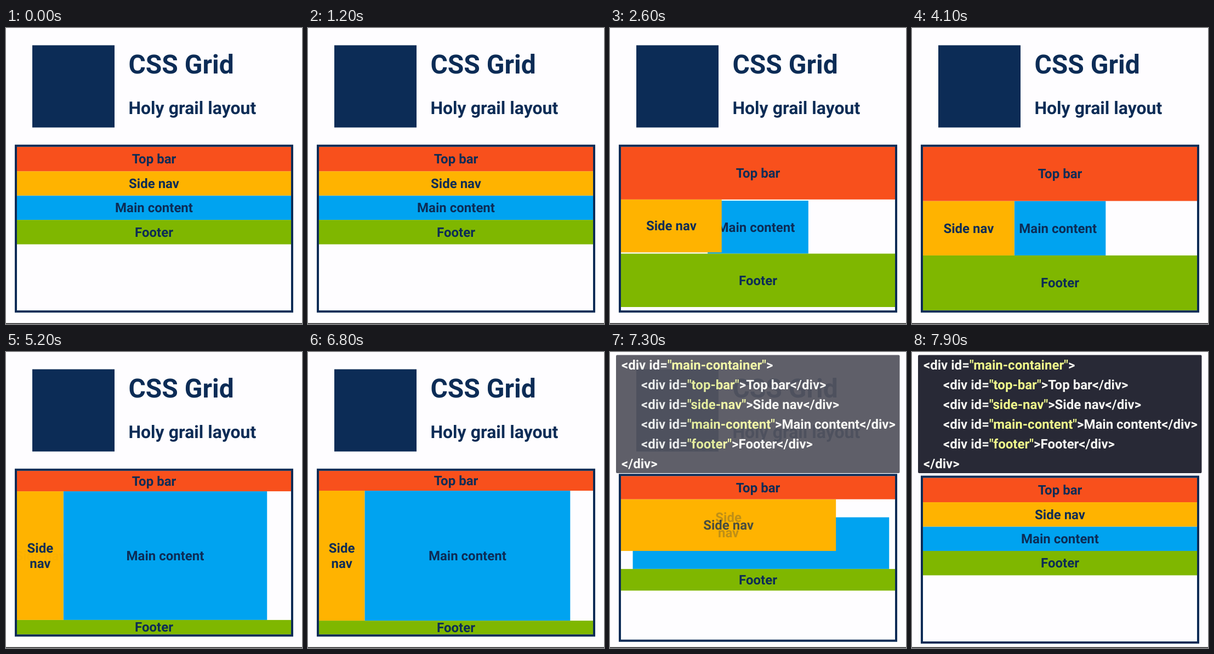
An HTML page that plays this animation: 540 px wide and 540 px high, repeating every 8000 ms.

```html
<!DOCTYPE html>
<html lang="en">
<head>
<meta charset="utf-8">
<title>Grid layout</title>
<style>
  html, body { margin: 0; width: 100%; height: 100%; overflow: hidden; background: #fefdff; }
  svg { display: block; width: 100vw; height: 100vh; }
  text { font: 700 24px Roboto, "Open Sans", sans-serif; text-rendering: geometricPrecision; }
  .label { fill: #0c2c56; text-anchor: middle; }
  #code text { fill: #f8f8f4; }
  #code .str { fill: #f1fa8c; }
</style>
</head>
<body>
<svg id="stage" viewBox="0 0 540 540">
  <rect width="540" height="540" fill="#fefdff"/>
  <g id="head" fill="#0c2c56">
    <rect x="48" y="31.5" width="150" height="150"/>
    <text x="223.4" y="83" style="font-size:48px">CSS Grid</text>
    <text x="223.4" y="157.2" style="font-size:32px">Holy grail layout</text>
  </g>
  <g id="boxes"></g>
  <rect id="frame" x="18" width="504" fill="none" stroke="#0c2c56" stroke-width="4"/>
  <g id="code">
    <rect x="11" y="5.5" width="517.5" height="215.5" rx="2" fill="#282936"/>
  </g>
  <rect y="538.5" width="540" height="1.5" fill="#222"/>
</svg>
<script>
const LOOP = 8000, MOVE = 1100;
const STARTS = [1810, 4285, 6812];
const LEFT = 20, TOP = 216.8, W = 500, H = 298.4, ROW = 44.45, SHIFT = 12.8;
const NAMES = ["main", "side", "top", "foot"];
const LABELS = { main: "Main content", side: "Side nav", top: "Top bar", foot: "Footer" };
const COLORS = { main: "#00a3f0", side: "#ffb300", top: "#f8501c", foot: "#7fb700" };

const $ = id => document.getElementById(id);
const lerp = (a, b, p) => a + (b - a) * p;

function add(parent, tag, attrs, text) {
  const el = document.createElementNS("http://www.w3.org/2000/svg", tag);
  for (const k in attrs) el.setAttribute(k, attrs[k]);
  if (text) el.textContent = text;
  return parent.appendChild(el);
}

// Each layout maps a box name to [left, top, right, bottom];
// nudge is the sideways offset of the main label.
const BASE = { dy: 0, wrap: 0, code: 0, nudge: 0 };

function stacked(dy) {
  const row = i => [LEFT, TOP + dy + ROW * i, LEFT + W, TOP + dy + ROW * (i + 1)];
  return { ...BASE, top: row(0), side: row(1), main: row(2), foot: row(3), dy };
}

function grid(a, b, c, d) {
  const x1 = LEFT + W * a, x2 = LEFT + W * b, right = LEFT + W;
  const y1 = TOP + H * c, y2 = TOP + H * d;
  return {
    ...BASE,
    top: [LEFT, TOP, right, y1], side: [LEFT, y1, x1, y2],
    main: [x1, y1, x2, y2], foot: [LEFT, y2, right, TOP + H]
  };
}

const STATES = [
  stacked(0),
  { ...grid(1 / 3, 2 / 3, 0.331, 0.664), nudge: -3.8 },
  { ...grid(1 / 6, 11 / 12, 0.1215, 0.916), wrap: 1 },
  { ...stacked(SHIFT), code: 1 }
];

// cubic-bezier(.25, .1, .25, 1)
function ease(x) {
  if (x <= 0 || x >= 1) return x <= 0 ? 0 : 1;
  let lo = 0, hi = 1, u = 0.5;
  for (let i = 0; i < 24; i++) {
    u = (lo + hi) / 2;
    if (0.75 * u * (1 - u) + u ** 3 < x) lo = u; else hi = u;
  }
  return 0.3 * u * (1 - u) ** 2 + 3 * u * u * (1 - u) + u ** 3;
}

const parts = {};
for (const name of NAMES) {
  const rect = add($("boxes"), "rect", { fill: COLORS[name] });
  const label = add($("boxes"), "text", { class: "label", y: 8.3 }, LABELS[name]);
  parts[name] = { rect, label };
}
const wrapped = add($("boxes"), "g", {});
parts.top.rect.before(wrapped);
["Side", "nav"].forEach((word, i) =>
  add(wrapped, "text", { class: "label", y: 8.3 + (i ? 14 : -14) }, word));

const LINES = [
  ["main-container", ""], ["top-bar", "Top bar"], ["side-nav", "Side nav"],
  ["main-content", "Main content"], ["footer", "Footer"]
];
LINES.forEach(([id, body], i) => {
  const line = add($("code"), "text", { x: i ? 57 : 21, y: 31.8 + 36 * i });
  add(line, "tspan", {}, "<div id=");
  add(line, "tspan", { class: "str" }, `"${id}"`);
  add(line, "tspan", {}, body ? `>${body}</div>` : ">");
});
add($("code"), "text", { x: 21, y: 211.8 }, "</div>");
$("frame").setAttribute("height", H + 4);

function draw(t) {
  let n = 0;
  while (n < STARTS.length - 1 && t >= STARTS[n + 1]) n++;
  const p = ease((t - STARTS[n]) / MOVE);
  const from = STATES[n], to = STATES[n + 1];
  const mix = key => lerp(from[key], to[key], p);

  for (const name of NAMES) {
    const [l, y, r, b] = from[name].map((v, i) => lerp(v, to[name][i], p));
    const { rect, label } = parts[name];
    rect.setAttribute("x", l);
    rect.setAttribute("y", y);
    rect.setAttribute("width", r - l);
    rect.setAttribute("height", b - y);
    const place = `translate(${(l + r) / 2} ${(y + b) / 2})`;
    label.setAttribute("transform", place);
    if (name === "side") wrapped.setAttribute("transform", place);
  }
  const wrap = mix("wrap"), code = mix("code");
  parts.main.label.setAttribute("x", mix("nudge"));
  parts.side.label.setAttribute("opacity", 1 - wrap);
  wrapped.setAttribute("opacity", wrap);
  $("frame").setAttribute("y", TOP - 2 + mix("dy"));
  $("head").setAttribute("opacity", 1 - code);
  $("code").setAttribute("opacity", code);
}

const t0 = performance.now();
function tick() {
  draw((performance.now() - t0) % LOOP);
  requestAnimationFrame(tick);
}
draw(0);
requestAnimationFrame(tick);
</script>
</body>
</html>
```
